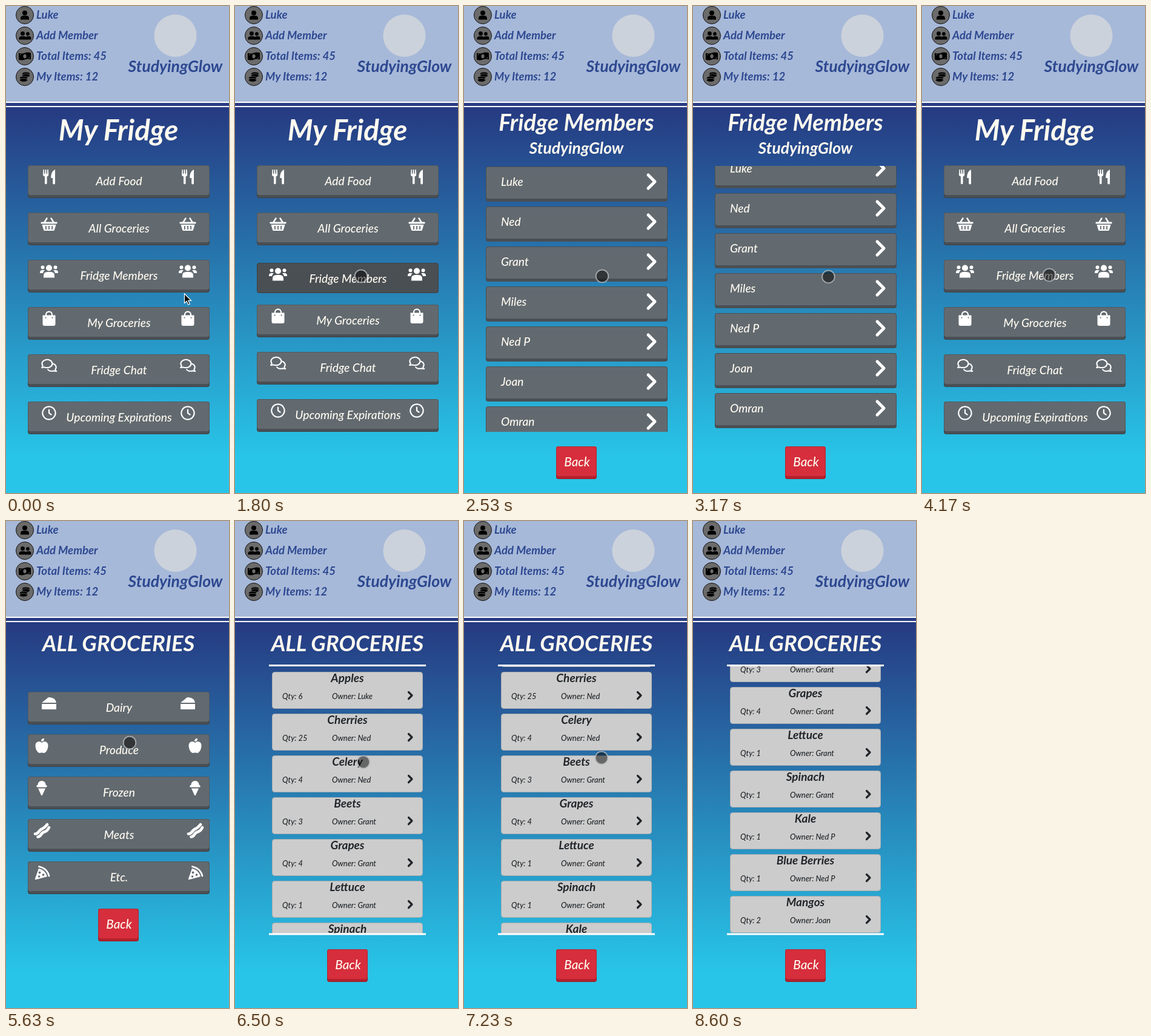
Recreate the animation shown at these times as an HTML page. Size 368 px wide and 804 px high, loop 8.63 s.

```html
<!DOCTYPE html>
<html lang="en">
<head>
<meta charset="utf-8">
<title>My Fridge</title>
<style>
  html, body { margin: 0; width: 100%; height: 100%; overflow: hidden; background: #28c5e8; }
  svg { display: block; width: 368px; height: 804px; }
  text { font-family: Lato, "Open Sans", sans-serif; font-style: italic; }
  .bold { font-weight: 700; }
  .hand { font-weight: 500; }
  .mid { text-anchor: middle; }
  .cream { fill: #fffaf0; }
  .navy { fill: #2d4890; }
  .ink { fill: #212529; }
  .base { fill: #4a4f54; height: 54px; }
  .face { fill: #626a70; }
  .edge { fill: none; stroke: #000; stroke-opacity: .16; height: 53px; }
  .red .base { fill: #b5212d; }
  .red .face { fill: #d62e3c; }
  .down .base { height: 50px; }
  .down .edge { height: 49px; }
  .down .face { opacity: 0; }
</style>
</head>
<body>
<svg id="stage" viewBox="0 0 368 804" xmlns="http://www.w3.org/2000/svg"></svg>
<script>
const LOOP = 8630;
const stage = document.getElementById('stage');
const group = (id, body, extra = '') => `<g id="${id}" ${extra}>${body}</g>`;
const at = (x, y, body, extra = '') => `<g transform="translate(${x} ${y})" ${extra}>${body}</g>`;
const text = (x, y, size, cls, str) => `<text x="${x}" y="${y}" font-size="${size}" class="${cls}">${str}</text>`;
const line = (d, width, color = '#fff') =>
  `<path d="${d}" fill="none" stroke="${color}" stroke-width="${width}" stroke-linecap="round" stroke-linejoin="round"/>`;
const shape = d => `<path d="${d}" fill-rule="evenodd"/>`;
const dot = (x, y, r) => `<circle cx="${x}" cy="${y}" r="${r}"/>`;

// Icons are centred on 0,0.
const torso = (x, y, w, h) => shape(`M${x - w} ${y + h}v-${h * .35}q0-${h * .65} ${w * .7}-${h * .65}h${w * .6}q${w * .7} 0 ${w * .7} ${h * .65}v${h * .35}z`);
const icons = {
  utensils: shape('M-9.5-12L-10-4Q-10-1-7-.5V10.5a1.8 1.8 0 0 0 3.6 0V-.5Q-.8-1-.8-4L-1.3-12h-1.6v7h-1.4l-.4-7h-1.6l-.4 7h-1.4v-7z')
    + shape('M10-12Q3-9 3.2 2H6.2V10.5a1.9 1.9 0 0 0 3.8 0z'),
  basket: line('M-7.5-3L-3.500-9.500M7.500-3L3.500-9.500', 2.4)
    + shape('M-12.5-3.5h25q1 0 1 1v1q0 1-1 1h-25q-1 0-1-1v-1q0-1 1-1z')
    + shape('M-11.5 1h23L9 9.5Q8.7 11 7.3 11H-7.3Q-8.7 11-9 9.5zM-6 3v6h1.8v-6zM-.9 3v6h1.8v-6zM4.2 3v6h1.8v-6z'),
  people: dot(0, -5.5, 5) + dot(-10.5, -6.5, 3) + dot(10.5, -6.5, 3) + torso(0, 1, 9, 9.5)
    + shape('M-15 3v-1q0-4 4-4h2q1.5 0 2 .6Q-9.500 0-10 3zM15 3v-1q0-4-4-4h-2q-1.500 0-2 .6Q9.500 0 10 3z'),
  bag: shape('M-10.500-5.500h21v14.500q0 3-3 3h-15q-3 0-3-3zM-5.500-2.500a1 1 0 1 0 .1 0zM5.500-2.500a1 1 0 1 0 .1 0z')
    + line('M-5-4v-2.500a5 4.800 0 0 1 10 0v2.500', 2.2),
  chat: line('M-12 3Q-10.500 2-10.300 0A8.500 6.600 0 1 1-4.500 3Q-7 3-8.500 2.200-10 3.300-12 3z', 2)
    + line('M6-3.500A7 6 0 0 1 10.300 6Q10.600 8 12.300 9 10 9.400 8 8.200 5 9.300 1.500 8.500-.8 7.700-2 6', 2),
  clock: line('M0-10.600A10.600 10.600 0 1 1-.1-10.600zM0-5.500V0l3.600 2.600', 2.2),
  cheese: shape('M-12-1L-1.500-9.500Q-.5-10.300 1-10 11-9 12-1z') + shape('M-12 1h24v7.500q0 1.500-1.500 1.500h-21q-1.500 0-1.500-1.500z'),
  apple: shape('M0-5Q3-7.500 6-6.800 10.500-5.500 10.500 0 10 8 5.500 11.500 3 12.500 0 11.300-3 12.500-5.500 11.500-10 8-10.500 0-10.500-5.500-6-6.800-3-7.500 0-5z')
    + shape('M-.8-7Q-1.500-12 4-12 4.500-7-.8-7z'),
  cone: shape('M-8-1.500Q-10-4-6.500-5.500-6-12 0-12 6-12 6.500-5.500 10-4 8-1.500z') + shape('M-6 .5H6L1 11.500Q0 13-1 11.500z'),
  bacon: line('M-11 5.500Q-8 6-5 2T1-3 9-10', 4.6) + line('M-6.500 10.500Q-3 10-1 6.500T5 2 12-5', 4.6),
  pizza: shape('M-5-7.500Q6.500-4.500 9 6L-9.500 11Q-11.500 11.500-11 9.500zM-3.500-2.500a1.900 1.900 0 1 0 .1 0zM2.500 1.200a1.800 1.800 0 1 0 .1 0zM-4.500 4.200a1.700 1.700 0 1 0 .1 0z')
    + line('M-4.500-10.500Q9-7.500 12 5', 2.8)
};

const button = (id, x, w, top, body, cls = '') => group(id,
  `<rect class="base" x="${x}" y="${top}" width="${w}" rx="4"/>
   <rect class="face" x="${x}" y="${top}" width="${w}" height="49" rx="4"/>
   <rect class="edge" x="${x + .5}" y="${top + .5}" width="${w - 1}" rx="4"/>${body}`, `class="${cls}"`);
const wideButton = (id, top, label, icon, left, right) => button(id, 36, 300, top,
  text(186.5, top + 33, 19.2, 'hand cream mid', label)
  + [left, right].map(x => at(x, top + 19, icons[icon], 'fill="#fff"')).join(''));
const backButton = (id, top) => button(id, 152, 67, top, text(186.5, top + 33, 20.8, 'hand cream mid', 'Back'), 'red');
const heading = (y, size, str) => text(185.5, y, size, 'bold cream mid', str);

const menu = [['Add Food', 'utensils'], ['All Groceries', 'basket'], ['Fridge Members', 'people'],
  ['My Groceries', 'bag'], ['Fridge Chat', 'chat'], ['Upcoming Expirations', 'clock']];
const kinds = [['Dairy', 'cheese'], ['Produce', 'apple'], ['Frozen', 'cone'], ['Meats', 'bacon'], ['Etc.', 'pizza']];
const members = ['Luke', 'Ned', 'Grant', 'Miles', 'Ned P', 'Joan', 'Omran'];
const foods = [['Apples', 6, 'Luke'], ['Cherries', 25, 'Ned'], ['Celery', 4, 'Ned'], ['Beets', 3, 'Grant'],
  ['Grapes', 4, 'Grant'], ['Lettuce', 1, 'Grant'], ['Spinach', 1, 'Grant'], ['Kale', 1, 'Ned P'],
  ['Blue Berries', 1, 'Ned P'], ['Mangos', 2, 'Joan']];
const team = 'StudyingGlow';

const memberCard = (name, i) => {
  const y = 265 + 66 * i;
  return `<rect x="36" y="${y}" width="300" height="58" rx="4" fill="#4a4f54"/>
    <rect x="37" y="${y + 1}" width="298" height="52" rx="3" fill="#626a70"/>`
    + text(61, y + 32, 19.2, 'hand cream', name) + at(309, y + 25, line('M-5-11L6 0-5 11', 5));
};
const foodCard = ([name, qty, owner], i) => {
  const y = 249 + 69 * i;
  return `<rect x="61.5" y="${y + .5}" width="248" height="60" rx="4" fill="#ccc" stroke="#a9acb0"/>`
    + text(185.5, y + 17, 19, 'bold ink mid', name) + text(78, y + 45, 12.8, 'hand ink', 'Qty: ' + qty)
    + text(160, y + 45, 12.8, 'hand ink', 'Owner: ' + owner) + at(289, y + 39, line('M-2.500-5.500L3 0-2.500 5.500', 3.2, '#212529'));
};

const badges = [
  ['Luke', dot(0, -3.5, 4) + torso(0, 1, 7, 6.5)],
  ['Add Member', dot(-3.5, -3.5, 3.4) + dot(5, -3, 2.9) + torso(-3.5, 1, 6, 5.5) + torso(6, 1, 4.5, 5.5)],
  ['Total Items: 45', shape('M-10-5.500Q-5-3.500 0-5.500T10-5.500V5.500Q5 3.500 0 5.500T-10 5.500zM0-3.500a2.700 3.500 0 1 0 .1 0zM-8-3.500v2l2-1.500zM8 3.500v-2l-2 1.500z')],
  ['My Items: 12', [[2, -6], [2, -3], [-2, 1], [-2, 4.5]].map(([x, y]) =>
    `<ellipse cx="${x}" cy="${y + .8}" rx="6.500" ry="2.900" stroke="#6b6b6b" stroke-width=".8"/>`).join('')]
];
const header = `<rect width="368" height="158" fill="#a7b9d9"/>
  <rect y="158" width="368" height="9" fill="#fff"/><rect y="160" width="368" height="5" fill="#283b84"/>`
  + badges.map(([label, icon], i) => at(31, 15 + 34 * i,
    `<circle r="14.500" fill="#6b6b6b" stroke="#111"/>${icon}` + text(19, 6, 18.6, 'bold navy', label))).join('')
  + '<circle cx="279.500" cy="49" r="35" fill="#ccd2db"/>'
  + text(279.5, 109, 26.5, 'bold navy mid', team);

stage.innerHTML = `<defs>
    <linearGradient id="sky" gradientUnits="userSpaceOnUse" x1="0" y1="159" x2="0" y2="745">
      <stop stop-color="#263880"/><stop offset="1" stop-color="#28c5e8"/></linearGradient>
    <clipPath id="memberClip"><rect x="30" y="264" width="312" height="439"/></clipPath>
    <clipPath id="foodClip"><rect x="56" y="240" width="260" height="441"/></clipPath>
  </defs>
  <rect width="368" height="804" fill="url(#sky)"/>${header}`
  + group('home', heading(222, 47.5, 'My Fridge')
    + menu.map(([label, icon], i) => wideButton('home' + i, 263 + 78 * i, label, icon, 71, 300)).join(''))
  + group('people', heading(206, 38, 'Fridge Members') + heading(244, 26.5, team)
    + `<g clip-path="url(#memberClip)">${group('memberList', members.map(memberCard).join(''))}</g>`
    + backButton('people0', 727))
  + group('kinds', heading(215, 36.4, 'ALL GROCERIES')
    + kinds.map(([label, icon], i) => wideButton('kinds' + i, 282 + 70 * i, label, icon, i ? 59 : 71, i ? 312 : 300)).join('')
    + backButton('kinds5', 640))
  + group('foods', heading(215, 36.4, 'ALL GROCERIES')
    + `<g clip-path="url(#foodClip)">${group('foodList', foods.map(foodCard).join(''))}</g>`
    + '<path d="M56 238.500H315M56 682H315" stroke="#fff" stroke-width="3"/>' + backButton('foods0', 707))
  + group('arrow', '<path d="M0 0V15.500L3.600 12.200 6.200 18 8.700 16.900 6.200 11.300H11z" stroke="#fff" stroke-width="1.200"/>')
  + group('touch', '<circle r="10.300" fill="#000" fill-opacity=".5" stroke="#b4b8bc" stroke-opacity=".85" stroke-width="1.800"/>');

const el = id => document.getElementById(id);
const sceneStarts = [['home', 0], ['people', 1900], ['home', 3760], ['kinds', 5400], ['foods', 6290]];
const buttonCount = { home: 6, people: 1, kinds: 6, foods: 1 };
const presses = [[1640, 1900, 2], [3610, 3760, 0], [5240, 5400, 1], [6080, 6290, 1]];
const pointer = [[0, 294.5, 475], [250, 294.5, 475], [850, 232, 448], [1500, 208, 446], [1900, 208, 446],
  [2350, 228, 446], [2680, 228, 446], [2980, 228, 424], [3100, 226, 426], [3560, 186, 752], [3780, 186, 752],
  [4150, 210, 444], [4350, 210, 444], [4850, 204, 366], [6320, 204, 366], [6780, 227, 459], [6950, 227, 459],
  [7230, 227, 391], [7700, 227, 270], [8630, 227, 262]];
const memberScroll = [[2680, 0], [2980, 22]];
const foodScroll = [[6950, 0], [7230, 69], [7700, 195], [8250, 251]];

// Eases between timed points; holds outside them.
function track(points, t) {
  const next = points.findIndex(p => p[0] > t);
  if (next === 0) return points[0].slice(1);
  if (next < 0) return points[points.length - 1].slice(1);
  const a = points[next - 1], b = points[next];
  const u = (t - a[0]) / (b[0] - a[0]), k = u * u * (3 - 2 * u);
  return a.slice(1).map((v, i) => v + (b[i + 1] - v) * k);
}
const move = (id, x, y) => el(id).setAttribute('transform', `translate(${x} ${y})`);
const show = (id, on) => el(id).setAttribute('visibility', on ? 'visible' : 'hidden');

function draw(t) {
  const scene = sceneStarts.filter(s => s[1] <= t).pop()[0];
  const press = presses.find(p => t >= p[0] && t < p[1]);
  const pressed = press ? press[2] : Infinity;
  for (const id in buttonCount) show(id, id === scene);
  for (let i = 0; i < buttonCount[scene]; i++) {
    el(scene + i).classList.toggle('down', i === pressed);
    move(scene + i, 0, i === pressed ? 5 : i > pressed ? -4 : 0);
  }
  move('memberList', 0, -Math.round(track(memberScroll, t)[0]));
  move('foodList', 0, -Math.round(track(foodScroll, t)[0]));
  const [x, y] = track(pointer, t);
  move('arrow', x, y);
  move('touch', x, y);
  show('arrow', t < 300);
  show('touch', t >= 300 && t < 8250);
}

const start = performance.now();
function tick() {
  draw((performance.now() - start) % LOOP);
  requestAnimationFrame(tick);
}
tick();
</script>
</body>
</html>
```
